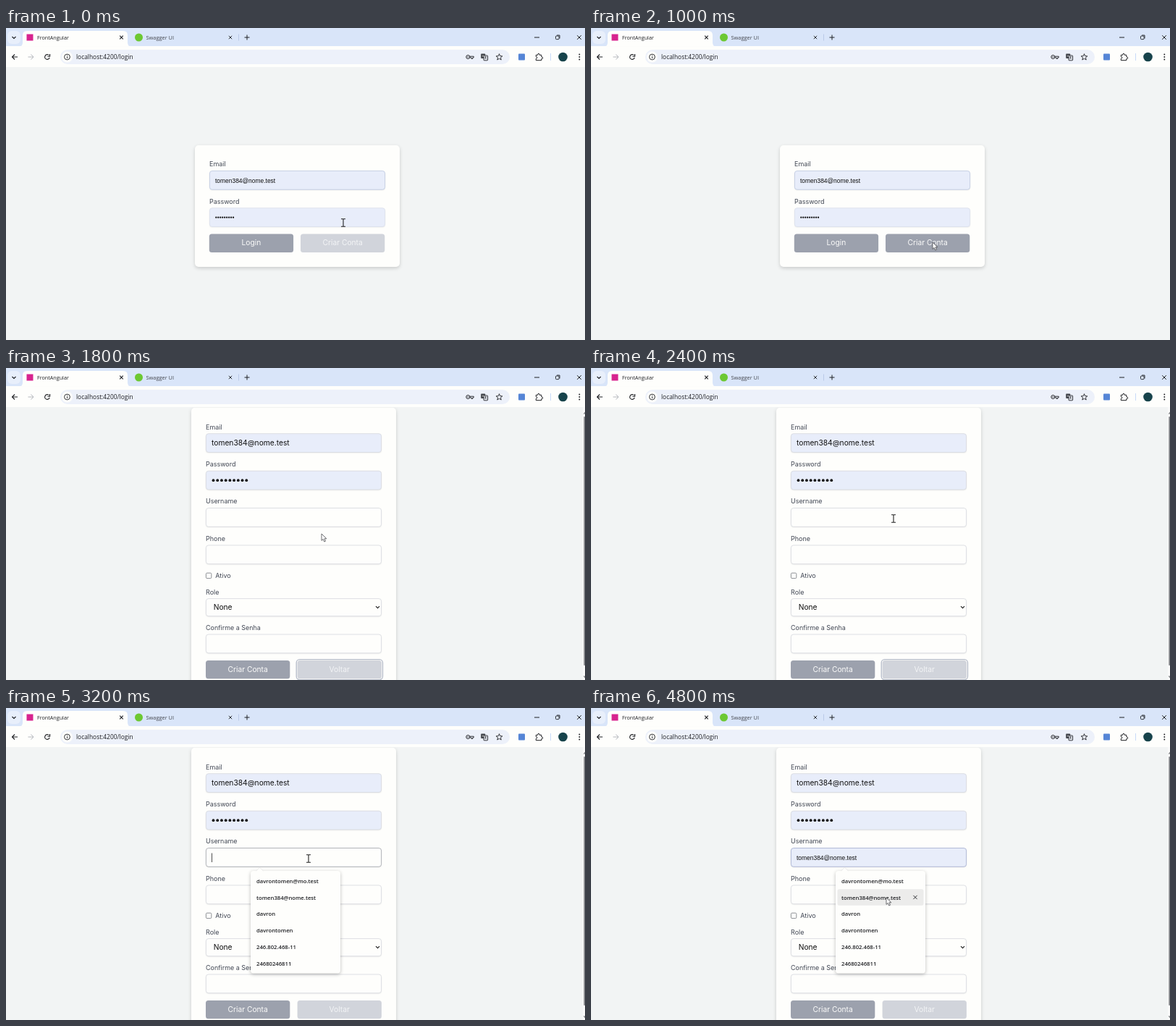
An HTML page with a canvas that plays this animation: 800 by 431 pixels, repeating every 5000 ms.

```html
<!DOCTYPE html>
<html lang="pt">
<head>
<meta charset="utf-8">
<title>FrontAngular</title>
<style>
html, body { margin: 0; width: 100%; height: 100%; overflow: hidden; background: #f2f4f4; }
canvas { display: block; width: 100%; height: 100%; }
</style>
</head>
<body>
<canvas id="stage"></canvas>
<script>
const W = 800, H = 431, LOOP = 5000, STEP = 200;
const canvas = document.getElementById('stage');
const ctx = canvas.getContext('2d');
const dpr = window.devicePixelRatio || 1;
canvas.width = W * dpr;
canvas.height = H * dpr;

const INTER = 'Inter, sans-serif';
const UI = '"Open Sans", "Noto Sans", sans-serif';
const ARIAL = '"Liberation Sans", Arial, sans-serif';
const INK = '#1f2024', WHITE = '#fefefc', FILLED = '#e8edfa';
const GREY = '#9ca1ad', PALE = '#d1d4db';
const EMAIL = 'tomen384@nome.test';
const OPTIONS = ['davrontomen@mo.test', EMAIL, 'davron', 'davrontomen',
  '246.802.468-11', '24680246811'];

// Pointer stops: time, x, y, kind (I = text beam, A = arrow).
const STOPS = [
  [0, 466, 269, 'I'], [200, 469, 287, 'A'], [400, 471, 294, 'A'], [600, 472, 296, 'A'],
  [1400, 471, 295, 'A'], [1600, 456, 268, 'I'], [1800, 436, 229, 'A'],
  [2000, 422, 211, 'I'], [2200, 418, 208, 'I'], [4000, 417, 210, 'I'],
  [4200, 414, 215, 'I'], [4400, 412, 220, 'A'], [4600, 410, 255, 'A'], [4800, 408, 262, 'A']
];

function text(str, x, y, size, font, color = INK, weight = 400, align = 'left') {
  ctx.font = `${weight} ${size}px ${font}`;
  ctx.fillStyle = color;
  ctx.textAlign = align;
  ctx.fillText(str, x, y);
}

function box(x, y, w, h, r, fill, stroke, lw = 0.8) {
  ctx.beginPath();
  ctx.roundRect(x, y, w, h, r);
  if (fill) { ctx.fillStyle = fill; ctx.fill(); }
  if (stroke) { ctx.strokeStyle = stroke; ctx.lineWidth = lw; ctx.stroke(); }
}

function disc(x, y, r, fill) {
  ctx.beginPath();
  ctx.arc(x, y, r, 0, 7);
  ctx.fillStyle = fill;
  ctx.fill();
}

function ring(x, y, r, color = INK, lw = 1, from = 0, to = 2 * Math.PI) {
  ctx.beginPath();
  ctx.arc(x, y, r, from, to);
  ctx.strokeStyle = color;
  ctx.lineWidth = lw;
  ctx.stroke();
}

function stroke(path, color = INK, lw = 1) {
  ctx.strokeStyle = color;
  ctx.lineWidth = lw;
  ctx.stroke(new Path2D(path));
}

function shadowed(blur, dy, color, draw) {
  ctx.save();
  ctx.shadowColor = color;
  ctx.shadowBlur = blur * dpr;
  ctx.shadowOffsetY = dy * dpr;
  draw();
  ctx.restore();
}

function cross(x, y, r, lw = 1) {
  stroke(`M${x - r} ${y - r}l${2 * r} ${2 * r}M${x + r} ${y - r}l${-2 * r} ${2 * r}`, INK, lw);
}

function tabs() {
  ctx.fillStyle = '#d9e5f9';
  ctx.fillRect(0, 0, W, 26);
  ctx.fillStyle = WHITE;
  ctx.fillRect(0, 25, W, 29);
  box(2, 4, 18, 18, 6, '#e8effb');
  stroke('M8.5 12l2.5 2.5l2.5 -2.5', INK, 1.2);
  ctx.fillStyle = WHITE;
  ctx.fill(new Path2D('M18 25.5Q23 25.5 23 20V10Q23 4 29 4H162Q168 4 168 10V20Q168 25.5 173 25.5Z'));
  box(28.5, 8.5, 9, 9, 0, '#d8248f');
  text('FrontAngular', 43, 15.8, 7.2, UI);
  cross(159.5, 13, 2.3, 1.1);
  disc(183.5, 13, 5.5, '#6cc832');
  text('Swagger UI', 193.5, 15.8, 7.4, UI, '#45484f');
  cross(310, 13, 2.2, 0.9);
  stroke('M321.5 8.5v9', '#b3c5e3', 0.8);
  stroke('M329.5 13h7M333 9.5v7', INK, 1);
  stroke('M730 13h7', INK, 1);
  box(759.5, 11, 4.6, 4.6, 1, null, INK, 0.9);
  stroke('M761 10h4v4.5', INK, 0.9);
  cross(792, 13, 2.8, 1);
}

function toolbar() {
  stroke('M16 40H8.5M12 36.5L8.5 40L12 43.5', INK, 1.1);
  stroke('M30.5 40H38M34.5 36.5L38 40L34.5 43.5', '#b4b7bc', 1);
  ring(57, 40, 3.3, INK, 1.1, 0.3, 5.5);
  stroke('M60.6 36v3.2h-3.2', INK, 1.1);

  box(75, 30, 621, 20, 10, '#edf1fa');
  disc(84.5, 40, 7.5, WHITE);
  ring(84.5, 40, 3.9, INK, 0.9);
  stroke('M84.5 39.4v2.6M84.5 37.5v1', INK, 0.9);
  text('localhost:4200/login', 97, 43, 8.4, UI);

  ring(638.3, 40, 2.5, INK, 1);
  disc(638.3, 40, 0.8, INK);
  stroke('M640.8 39.2h5.4v1.7h-1.4v1.5h-1.8v-1.5h-2.2', INK, 0.9);
  box(656.2, 35.5, 6, 6.5, 0.8, '#474a50');
  box(660, 38, 5.6, 6.8, 0.8, '#edf1fa', INK, 0.9);
  stroke('M661.3 40h3M662.8 39v1q0 2 -1.5 3M661.7 41l2.5 2', INK, 0.6);
  stroke('M658 38.8h2.5', WHITE, 0.8);

  ctx.beginPath();
  for (let i = 0; i < 10; i++) {
    const r = i % 2 ? 2 : 4.6, a = i * Math.PI / 5 - Math.PI / 2;
    ctx.lineTo(681.5 + r * Math.cos(a), 40.3 + r * Math.sin(a));
  }
  ctx.closePath();
  ctx.strokeStyle = INK;
  ctx.lineWidth = 0.9;
  ctx.stroke();

  box(708, 35.5, 9, 9, 1, '#5686d6');
  stroke('M732.3 37.3h2.3q0 -2 1.3 -2t1.3 2h2.6v2.6q1.9 0 1.9 1.4t-1.9 1.4v2h-7.5v-2.4q1.6 -.2 1.6 -1.4t-1.6 -1.4z', INK, 1);
  stroke('M752.5 35v10', '#c8daf8', 1);
  disc(769.5, 40, 6.3, '#17434b');
  for (const y of [36.5, 40, 43.5]) disc(792.3, y, 0.95, INK);
}

function label(str, x, y) {
  text(str, x, y, 8.96, INTER, '#414754');
}

function field(x, y, fill = WHITE, border = '#d6d9df') {
  shadowed(2, 0.8, 'rgba(0,0,0,.1)', () => box(x + 0.4, y + 0.4, 242.2, 25.8, 3.5, fill));
  box(x + 0.4, y + 0.4, 242.2, 25.8, 3.5, null, border);
}

function bullets(x, y, gap, r) {
  for (let i = 0; i < 9; i++) disc(x + i * gap, y, r, '#111');
}

function button(str, x, y, fill, ink = '#fbfbfa') {
  box(x, y, 116.3, 25.3, 3.5, fill);
  text(str, x + 58.1, y + 15.8, 10.25, INTER, ink, 400, 'center');
}

function card(x, y, h) {
  shadowed(5, 2, 'rgba(0,0,0,.17)', () => box(x, y, 283, h, 5, WHITE));
}

function login(t) {
  card(261, 162, 168);
  label('Email', 281, 191);
  field(281, 197, FILLED, '#bdc8e0');
  text(EMAIL, 289, 213.5, 8.45, ARIAL, '#111');
  label('Password', 281, 242.5);
  field(281, 248.3, FILLED, '#dbe0ec');
  bullets(290.3, 261.7, 2.97, 1.15);
  button('Login', 280.8, 284.6, GREY);
  const hover = t >= 400 ? GREY : t >= 200 ? '#b7bbc4' : PALE;
  button('Criar Conta', 407, 284.6, hover, t < 400 ? '#f3f4f6' : undefined);
}

function signup(t) {
  const focused = t >= 3200, preview = t >= 4600;
  card(256, 54.7, 400);
  label('Email', 276, 84.5);
  field(276, 90.3, FILLED);
  text(EMAIL, 284, 107.3, 10.25, INTER, '#111');
  label('Password', 276, 136);
  field(276, 141.8, FILLED);
  bullets(286.5, 155.2, 5.72, 1.9);
  label('Username', 276, 187.3);
  field(276, 193.1, preview ? FILLED : WHITE,
    preview ? '#a3add0' : focused ? '#a0a3aa' : undefined);
  if (preview) text(EMAIL, 284, 209.6, 8.45, ARIAL, '#111');
  else if (focused && (t < 3600 || t >= 4200)) stroke('M284.5 200.5v12.5', '#222', 0.8);
  label('Phone', 276, 238.8);
  field(276, 244.5);
  box(276.4, 283.2, 7.4, 7.4, 1.4, WHITE, '#70747b', 0.8);
  label('Ativo', 289.3, 290.2);
  label('Role', 276, 312.8);
  shadowed(2, 0.8, 'rgba(0,0,0,.1)', () => box(276.4, 318.6, 242.2, 24.2, 3.5, WHITE));
  box(276.4, 318.6, 242.2, 24.2, 3.5, null, '#d6d9df');
  text('None', 286.7, 334.3, 10.25, INTER, '#111');
  stroke('M511 329.2l2.5 2.5l2.5 -2.5', '#222', 1.2);
  label('Confirme a Senha', 276, 362);
  field(276, 367.6);
  button('Criar Conta', 276, 404, GREY);
  if (!focused) box(401.2, 402.6, 119.3, 28, 4.5, WHITE, '#b4bac8', 1.3);
  button('Voltar', 402.6, 404, PALE, '#f3f4f6');

  ctx.fillStyle = '#fafafa';
  ctx.fillRect(797, 54, 3, 377);
  box(798.3, 67, 1.7, 344, 0.8, '#85878b');
  ctx.fillStyle = '#85878b';
  ctx.fill(new Path2D('M797.5 63.5l2.5 -3v3zM797.5 425.5h2.5v3z'));
}

function suggestions(t) {
  shadowed(5, 1.5, 'rgba(0,0,0,.26)', () => box(338, 225, 124, 141.5, 4, WHITE));
  ctx.fillStyle = WHITE;
  ctx.fill(new Path2D('M345.5 225.5l5 -5l5 5z'));
  stroke('M345.5 225l5 -4.7l5 4.7', '#dfe0e1', 0.6);
  if (t >= 4600) {
    box(340.5, 250.3, 119, 22.4, 2.5, '#ececeb');
    cross(448, 261.5, 2.6, 0.9);
  }
  OPTIONS.forEach((o, i) => text(o, 346, 242 + i * 22.7, 7.7, UI, INK, 600));
}

function pointer(t) {
  const [, x, y, kind] = STOPS.filter(s => s[0] <= t).pop();
  ctx.save();
  ctx.translate(x, y);
  if (kind === 'I') {
    const beam = 'M-3 -5.2h2.2q.8 0 .8 .8v8.8q0 .8 -.8 .8h-2.2M3 -5.2h-2.2q-.8 0 -.8 .8M0 4.4q0 .8 .8 .8h2.2';
    stroke(beam, '#222', 1.1);
  } else {
    const arrow = new Path2D('M0 0v9.4l2.2 -2l1.6 3.6l1.7 -.8l-1.6 -3.4h3z');
    ctx.fillStyle = '#fff';
    ctx.fill(arrow);
    ctx.strokeStyle = '#4a4b4f';
    ctx.lineWidth = 0.8;
    ctx.stroke(arrow);
  }
  ctx.restore();
}

function draw(t) {
  ctx.setTransform(dpr, 0, 0, dpr, 0, 0);
  ctx.fillStyle = '#f2f4f4';
  ctx.fillRect(0, 0, W, H);
  if (t < 1200) login(t);
  else signup(t);
  if (t >= 3200) suggestions(t);
  tabs();
  toolbar();
  pointer(t);
}

const start = performance.now();
function tick() {
  const t = (performance.now() - start) % LOOP;
  draw(Math.floor(t / STEP) * STEP);
  requestAnimationFrame(tick);
}
tick();
</script>
</body>
</html>
```
